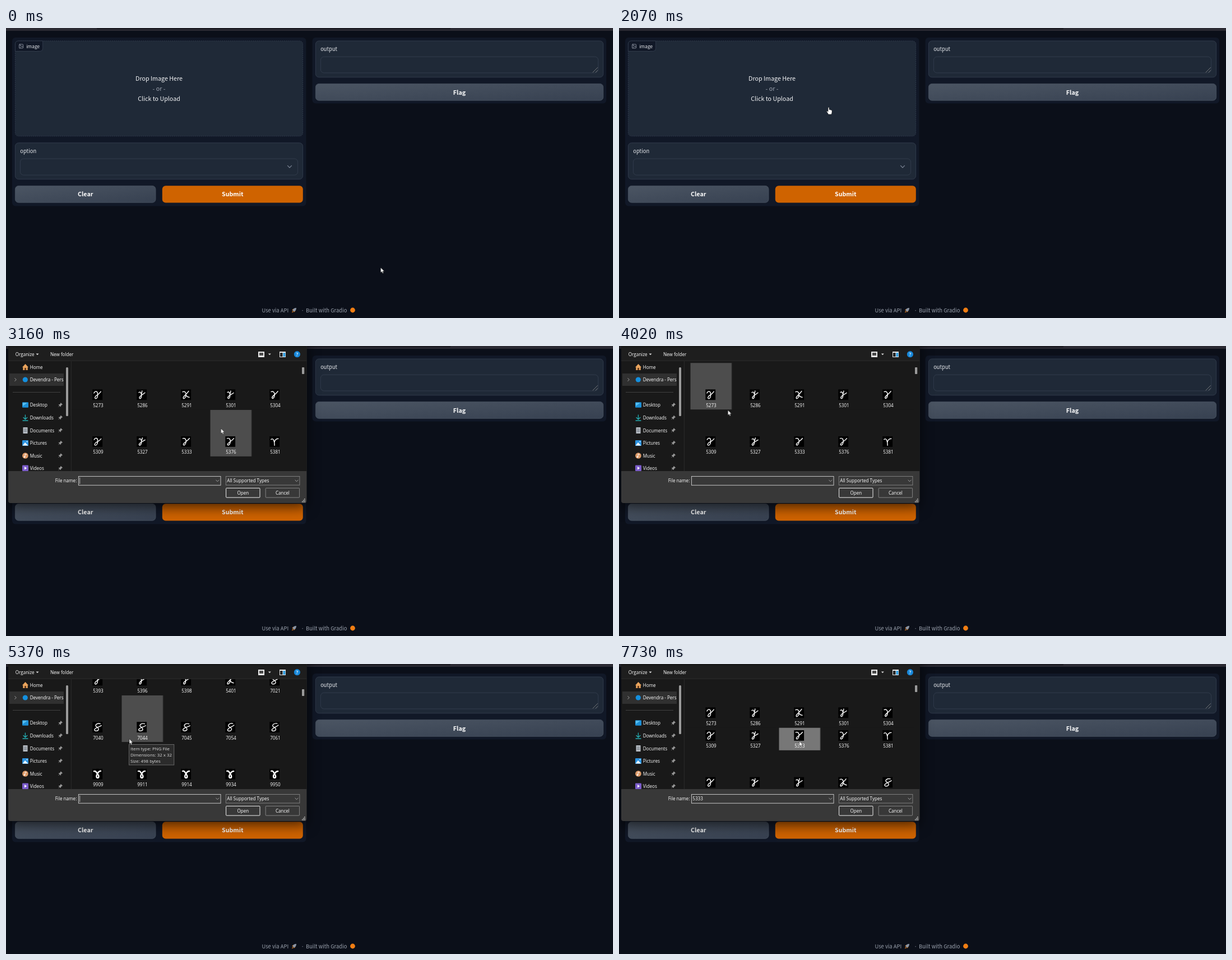
An HTML page that plays this animation: 1083x517 px, repeating every 8000 ms.

```html
<!DOCTYPE html>
<html lang="en">
<head>
<meta charset="utf-8">
<title>Image upload demo</title>
<style>
html, body { margin: 0; width: 100%; height: 100%; overflow: hidden; background: #0b0f19; }
svg { display: block; width: 100%; height: 100%; }
text { white-space: pre; }

.page { font: 9.4px "Noto Sans CJK JP", "Noto Sans CJK SC", "Noto Sans CJK", Lato, sans-serif; fill: #e5e7eb; }
.big { font-size: 10.7px; fill: #f3f4f6; }
.bold { font-size: 10.7px; font-weight: 700; fill: #fff; }
.mid { text-anchor: middle; }
.muted { fill: #9ca3af; }
.panel { fill: #111827; }
.block { fill: #1f2937; stroke: #374151; stroke-width: .8; }
.line { fill: none; stroke-linecap: round; stroke-linejoin: round; }

.win { font: 8.1px "Open Sans", "Noto Sans", sans-serif; fill: #fff; }
.field { fill: #383838; }
.hover { fill: #4d4d4d; opacity: 0; }
.tip { fill: #dcdcdc; }

/* One shared 8 s clock: 1% is 80 ms. */
.dialog { animation: open 8s linear infinite; }
.top-row { animation: scroll-top 8s linear infinite; }
.rows { animation: scroll-rows 8s linear infinite; }
.thumb { animation: scroll-thumb 8s linear infinite; }
.tooltip { animation: tooltip 8s linear infinite; }
.pointer { animation: travel 8s linear infinite; }
.arrow { animation: arrow 8s step-end infinite; }
.hand { animation: hand 8s step-end infinite; }
.busy { animation: busy 8s step-end infinite; }
.caret { animation: caret 8s step-end infinite; }
.chosen { animation: chosen 8s step-end infinite; }
.h13 { animation: h13 8s step-end infinite; }
.h12 { animation: h12 8s step-end infinite, pick 8s step-end infinite; }
.h11 { animation: h11 8s step-end infinite; }
.h10 { animation: h10 8s step-end infinite; }
.h00 { animation: h00 8s step-end infinite; }
.h31 { animation: h31 8s step-end infinite; }

@keyframes open { 0%, 36.6% { opacity: 0 } 38.3%, 100% { opacity: 1 } }
@keyframes scroll-top {
  0%, 61.9% { transform: translateY(0); animation-timing-function: ease-out }
  65.5%, 71.3% { transform: translateY(-225px) }
  72.37% { transform: translateY(-43px); animation-timing-function: step-start }
  72.38%, 100% { transform: translateY(0) }
}
@keyframes scroll-rows {
  0%, 61.9% { transform: translateY(0); animation-timing-function: ease-out }
  65.5%, 71.3% { transform: translateY(-225px) }
  72.37%, 100% { transform: translateY(-43px) }
}
@keyframes scroll-thumb {
  0%, 61.9% { transform: translateY(0); animation-timing-function: ease-out }
  65.5%, 71.3% { transform: translateY(7px) }
  72.37%, 100% { transform: translateY(0) }
}
@keyframes tooltip {
  0%, 66.2% { opacity: 0 }
  67.1%, 74.8% { opacity: 1 }
  76.4%, 77.5% { opacity: .6 }
  79%, 100% { opacity: 0 }
}
@keyframes travel {
  0%, .87% { transform: translate(668.5px, 427px) }
  1.5%, 14.4% { transform: translate(668.5px, 424px); animation-timing-function: ease-in-out }
  24.1%, 24.6% { transform: translate(387px, 149px) }
  25.8%, 37% { transform: translate(374px, 141px) }
  39.4%, 40.1% { transform: translate(383.5px, 147px) }
  43.1% { transform: translate(285px, 140px) }
  46.2% { transform: translate(235px, 128px) }
  48.7% { transform: translate(190px, 103px) }
  50.2%, 51.4% { transform: translate(194.3px, 114.3px) }
  53.6%, 77.5% { transform: translate(220px, 133.5px) }
  80.6%, 83.1% { transform: translate(332px, 137px) }
  87.4%, 100% { transform: translate(321.7px, 137.5px) }
}
@keyframes arrow { 0% { opacity: 1 } 22.4% { opacity: 0 } 32.5%, 100% { opacity: 1 } }
@keyframes hand { 0% { opacity: 0 } 22.4% { opacity: 1 } 30.75%, 100% { opacity: 0 } }
@keyframes busy { 0% { opacity: 0 } 30.75% { opacity: 1 } 32.5%, 100% { opacity: 0 } }
@keyframes caret {
  0%, 44.6%, 57.9%, 71.1%, 84.4%, 93.25%, 100% { opacity: 0 }
  38%, 51.25%, 64.5%, 77.75%, 91% { opacity: 1 }
}
@keyframes chosen { 0% { opacity: 0 } 93.25%, 100% { opacity: 1 } }
@keyframes pick { 0% { fill: #4d4d4d } 93.25%, 100% { fill: #777 } }
@keyframes h13 { 0%, 40.7%, 100% { opacity: 0 } 36.6% { opacity: 1 } }
@keyframes h12 { 0%, 43.1% { opacity: 0 } 40.7%, 78.4%, 100% { opacity: 1 } }
@keyframes h11 { 0%, 47.8%, 62.8%, 78.4%, 100% { opacity: 0 } 43.1%, 52.3%, 72.37% { opacity: 1 } }
@keyframes h10 { 0%, 52.3%, 100% { opacity: 0 } 51.4% { opacity: 1 } }
@keyframes h00 { 0%, 51.4%, 100% { opacity: 0 } 47.8% { opacity: 1 } }
@keyframes h31 { 0%, 72.37%, 100% { opacity: 0 } 64% { opacity: 1 } }
</style>
</head>
<body>
<svg viewBox="0 0 1083 517">
  <defs>
    <linearGradient id="grey" x2="1" y2="1"><stop stop-color="#4b5563"/><stop offset="1" stop-color="#374151"/></linearGradient>
    <clipPath id="list"><path d="M117 27H536V223H117Z"/></clipPath>
    <clipPath id="side"><path d="M4 27H103V223H4Z"/></clipPath>
    <path id="pin" d="M.8 -3.6 3.6 -.8 2.3 -.4 .6 1.5 .4 3 -3 -.4 -1.5 -.6 .4 -2.3ZM-1.3 1.3-3.4 3.4" fill="#9a9a9a" stroke="#9a9a9a" stroke-width=".7"/>
    <path id="down" class="line" d="M-2.6 -1.3 0 1.3 2.6 -1.3"/>
  </defs>

  <g class="page">
    <path d="M0 0H1083V5H0Z" fill="#2b2a33"/>
    <path d="M162 0H793V1.5Q793 2.5 791 2.5H164Q162 2.5 162 1.5Z" fill="#1c1b22"/>

    <rect class="panel" x="11" y="17" width="524.5" height="300.5" rx="6"/>
    <rect class="panel" x="546.5" y="17" width="524.5" height="117.5" rx="6"/>

    <rect class="block" x="16.4" y="23" width="513.2" height="169.8" rx="6" stroke-dasharray="2.2 1.5"/>
    <path d="M16.4 41.5V29Q16.4 23 22.4 23H65.6V35.5Q65.6 41.5 59.6 41.5Z" fill="#111827" stroke="#374151" stroke-width=".8"/>
    <g class="line" stroke="#9ca3af" stroke-width=".8">
      <rect x="23.5" y="29" width="7" height="7" rx="1"/>
      <path d="M24.5 36 28.3 32.2 30.5 34.3"/><circle cx="25.8" cy="31.3" r=".7"/>
    </g>
    <text x="36.3" y="35.8" font-size="8.3">image</text>
    <g class="mid">
      <text class="big" x="273" y="94">Drop Image Here</text>
      <text class="big" x="273" y="112" style="fill:#9ca3af">- or -</text>
      <text class="big" x="273" y="130">Click to Upload</text>
    </g>

    <rect class="block" x="16.4" y="204.8" width="513.2" height="64.8" rx="6"/>
    <text x="25.3" y="223">option</text>
    <rect class="block" x="25.4" y="233" width="495.2" height="29.2" rx="6"/>
    <use href="#down" transform="translate(506 247.2) scale(1.35)" stroke="#7b8494" stroke-width=".9"/>

    <rect x="16.4" y="281.4" width="250.6" height="29.8" rx="6" fill="url(#grey)" stroke="#4b5563" stroke-width=".8"/>
    <rect x="278.8" y="281.2" width="251" height="30.2" rx="6" fill="#cf6300"/>
    <text class="bold mid" x="141.7" y="300.3">Clear</text>
    <text class="bold mid" x="404.2" y="300.3">Submit</text>

    <rect class="block" x="552.4" y="23" width="513.2" height="64.8" rx="6"/>
    <text x="561.2" y="41.3">output</text>
    <rect class="block" x="561.4" y="51.2" width="495.2" height="28.8" rx="6"/>
    <path class="line" d="M1047 79 1055.5 70.5M1052 79 1055.5 75.5" stroke="#8b8b8b" stroke-width=".8"/>
    <rect x="552.4" y="99.4" width="513.2" height="29.8" rx="6" fill="url(#grey)" stroke="#4b5563" stroke-width=".8"/>
    <text class="bold mid" x="809" y="118.5">Flag</text>

    <g class="muted">
      <text x="456.5" y="506.5">Use via API</text>
      <text x="526.5" y="506.5">·</text>
      <text x="535" y="506.5">Built with Gradio</text>
    </g>
    <path d="M518 499Q513 499 511 503L514 506Q518 504 518 499Z" fill="#8b95a5"/>
    <path d="M512.5 500.5 510 503.5 511.7 503.2ZM516.5 504.5 513.5 507 513.8 505.3ZM511.3 504.5 513 506 509.8 507.5Z" fill="#e8821e"/>
    <circle cx="618.5" cy="503" r="4.4" fill="#f07d13"/>
  </g>

  <g class="dialog win">
    <path d="M4 -20H536.5V276Q536.5 280 532.5 280H8Q4 280 4 276Z" fill="#383838" style="filter:drop-shadow(0 8px 11px rgba(0,0,0,.62))"/>
    <path d="M4 0H536.5V223H4Z" fill="#191919"/>
    <path d="M4 3H536.5V26H4Z" fill="#1e1e1e"/>
    <path d="M4 26.3H536.5M116.3 27V223" stroke="#2d2d2d" stroke-width=".9"/>

    <text x="16.7" y="18">Organize</text>
    <path d="M53.5 13.5H58.5L56 16.3ZM467.8 13.5H472.8L470.3 16.3Z" fill="#ddd"/>
    <text x="79" y="18">New folder</text>
    <path d="M450 10H461V20H450Z" fill="#e8e8e8"/><path d="M452 12H459V17H452Z" fill="#4a4a4a"/>
    <path d="M488 10H499V20H488Z" fill="#e8e8e8"/><path d="M489 12H493.5V19H489Z" fill="#222"/><path d="M494.5 12H498.3V19H494.5Z" fill="#2c9be0"/>
    <circle cx="519.4" cy="14.7" r="5.6" fill="#1787d8"/>
    <text class="mid" x="519.4" y="17.7" font-weight="600">?</text>

    <g clip-path="url(#side)">
      <path d="M6 49H103V71H6Z" fill="#303030"/>
      <path class="line" d="M15.7 57.4 18.3 60 15.7 62.6" stroke="#aaa" stroke-width=".9"/>
      <circle cx="34.3" cy="60" r="4.6" fill="#1490df"/>
      <path d="M29 38 34.5 32 40 38H38.7V43H30.3V38Z" fill="#e9a35c"/><path d="M33 39H36V43H33Z" fill="#6b3f1d"/>
      <path d="M12 82.5H97" stroke="#444" stroke-width=".9"/>
      <rect x="29" y="100.3" width="11" height="9.4" rx="1" fill="#1d8fd6"/><path d="M30 101.3H38L30 107Z" fill="#58bff0"/>
      <path class="line" d="M34.4 123V130.5M31 127.5 34.4 130.8 37.8 127.5M30 133H39" stroke="#25b0b5" stroke-width="1.3"/>
      <path d="M30.5 145H38.5V156H30.5Z" fill="#b9bfc6"/><path d="M32 148H37M32 150.3H37M32 152.6H37" stroke="#5c6670" stroke-width=".9"/>
      <rect x="29" y="168" width="11" height="10" rx="1" fill="#2a92e0"/><path d="M29.5 177.5 34 171.8 39.5 177.5Z" fill="#e9f5ff"/><circle cx="37.5" cy="170.5" r=".9" fill="#fff"/>
      <circle cx="34.4" cy="195.5" r="5.3" fill="#dd9a68"/><path d="M34 197.5V192.5L37 193.5" fill="none" stroke="#fff"/><circle cx="33" cy="197.7" r="1.3" fill="#fff"/>
      <rect x="29" y="212.5" width="11" height="10.5" rx="1" fill="#7b5cc9"/><path d="M33 215 37.2 217.7 33 220.4Z" fill="#fff"/>
      <g id="places"></g>
    </g>
    <rect x="107" y="38" width="4" height="87" rx="1.5" fill="#9b9b9b"/>

    <g clip-path="url(#list)">
      <g class="rows"></g>
      <g class="top-row"></g>
    </g>
    <rect class="thumb" x="528" y="38" width="4.2" height="12" rx=".8" fill="#9b9b9b"/>

    <text x="126.3" y="243.3" text-anchor="end">File name:</text>
    <rect class="field" x="129.4" y="232.4" width="253.6" height="15.8" stroke="#d5d5d5" stroke-width=".9"/>
    <text class="chosen" x="131.3" y="243.3">5333</text>
    <path class="caret" d="M131.7 234.5V245.8" stroke="#ddd" stroke-width=".8"/>
    <rect class="field" x="392.3" y="232.4" width="131.6" height="15.6" stroke="#888" stroke-width=".9"/>
    <text x="394.3" y="243.3">All Supported Types</text>
    <g stroke="#bbb" stroke-width=".8"><use href="#down" x="377.3" y="240.3"/><use href="#down" x="518.5" y="240.3"/></g>
    <rect class="field" x="392.6" y="253.3" width="60.4" height="16.8" rx="1" stroke="#f0f0f0"/>
    <rect class="field" x="463.2" y="253.3" width="60.4" height="16.8" rx="1" stroke="#999" stroke-width=".8"/>
    <text class="mid" x="422.8" y="264.7">Open</text>
    <text class="mid" x="493.4" y="264.7">Cancel</text>
    <path d="M532 272.8H534M530 275.3H534M528 277.6H534" stroke="#c4c4c4" stroke-width="1.6" stroke-dasharray="1.5 .8"/>

    <g class="tooltip">
      <rect x="219.4" y="143.4" width="80.4" height="36.6" fill="#2b2b2b" stroke="#777" stroke-width=".8"/>
      <g class="tip" font-size="7.9">
        <text x="222" y="153.8">Item type: PNG File</text>
        <text x="222" y="165">Dimensions: 32 x 32</text>
        <text x="222" y="176.2">Size: 498 bytes</text>
      </g>
    </g>
  </g>

  <g class="pointer">
    <path class="arrow" d="M0 0V9.2L2.1 7.3 3.5 10.4 5.1 9.7 3.7 6.7H6.5Z" fill="#fff" stroke="#000" stroke-width=".5"/>
    <path class="hand" d="M-1 1Q0 -.4 1 1V4.6Q2 4 2.8 4.9 3.7 4.4 4.4 5.4 5.9 5 6 6.6V9Q6 10.5 5 13H-.5Q-1.5 10.5-3.3 8.4-3.6 6.8-2.2 7L-1 8.2Z" fill="#fff" stroke="#000" stroke-width=".5"/>
    <circle class="busy" r="7" fill="none" stroke="#3f9be0" stroke-width="3"/>
  </g>
</svg>

<script>
const $ = (sel) => document.querySelector(sel);

// Sidebar labels; a pin follows every quick-access folder.
const places = ["Home", "Devendra - Personal", "", "Desktop", "Downloads", "Documents", "Pictures", "Music", "Videos"];
$("#places").innerHTML = places.map((name, i) => {
  const y = 37.5 + i * 22.55;
  const pin = i > 2 ? `<use href="#pin" x="97" y="${y}"/>` : "";
  return `<text x="42.7" y="${y + 3.3}">${name}</text>${pin}`;
}).join("");

// Handwritten letter strokes in an 18 by 18 box.
const strokes = {
  a: "M3 6C5 2 9 2 9.5 7C10 12 8 16 5.5 16C2.5 15.5 5 11 9 9.5C12 8 14 6 15.5 4",
  b: "M4 5C7 3 8.5 6 8.5 10C8.5 16 5 17.5 4.5 14.5C5 11 11 9 15 6M9 7 10 2.5",
  c: "M3 4C8 2 10 7 9 11C7 17 3 17 4 14C7 9 11 8 14 3M8 10C11 12 12 14 15 14",
  d: "M3 4C7 2 10 6 9 11C8 16 5 17 4.5 14.5C5 11 11 9 15 3",
  r: "M3 5C7 2 9 7 8.5 16M8.5 11C9.5 7 12 4 16 4.5",
  e: "M14 3C9 1.5 4 5 6.5 8C9 9.5 12 11 11 14C9 17 3 16.5 4 13.5C6 10 12 9 16 6",
  g: "M3 4C7 2.5 8 8 9 9C10 7 11 4 15 4M9 9C6 12 7 16 9 16C12 16 12 12 9 9"
};
const kinds = "abcbdabddrabbceeeeeeggggg";
const names = ("5273 5286 5291 5301 5304 5309 5327 5333 5376 5381 5393 5396 5398 5401 7021 " +
  "7040 7044 7045 7054 7061 9909 9911 9914 9934 9950").split(" ");

const tiles = names.map((name, i) => {
  const row = Math.floor(i / 5), col = i % 5, kind = kinds[i];
  const tilt = (i * 37) % 9 - 4;
  return `<g transform="translate(${127.5 + col * 79} ${30.2 + row * 83.6})">
    <rect class="hover h${row}${col}" width="73.6" height="83"/>
    <rect x="26.8" y="47.2" width="17.8" height="18.8" fill="#000"/>
    <path class="line" d="${strokes[kind]}" transform="translate(26.6 47.4) rotate(${tilt} 9 9)"
      stroke="#fff" stroke-width="${kind === "g" ? 2.4 : 1.4}"/>
    <text class="mid" x="37" y="78.6">${name}</text></g>`;
});

// The top row has its own backing, so it can cover the rows scrolled beneath it.
$(".rows").innerHTML = tiles.slice(5).join("");
$(".top-row").innerHTML = '<path d="M117 27H526V113.8H117Z" fill="#191919"/>' + tiles.slice(0, 5).join("");
</script>
</body>
</html>
```
